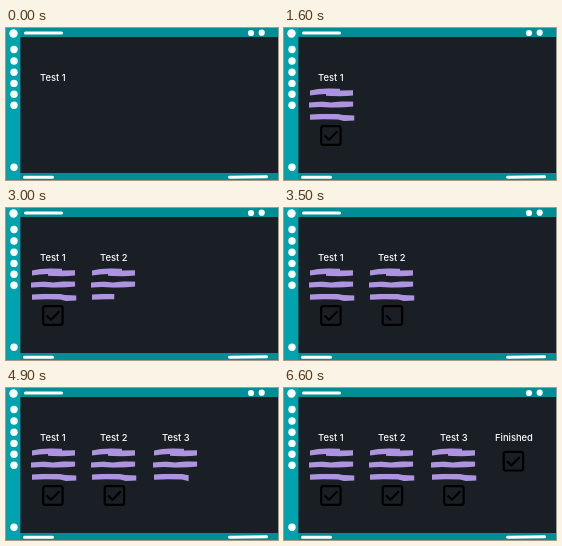
Recreate the animation shown at these times as an HTML page. Size 272x152 px, loop 7000 ms.

```html
<!DOCTYPE html>
<html lang="en">
<head>
<meta charset="utf-8">
<title>Test board</title>
<style>
  html, body { margin: 0; width: 100%; height: 100%; overflow: hidden; background: #1a1f25; }
  svg { display: block; width: 272px; height: 152px; }
  text { font: 500 9.4px Inter, "Open Sans", sans-serif; fill: #fff; }
  .bar { stroke: #fff; stroke-linecap: round; stroke-width: 3; }
  .tick path { fill: none; stroke: #000; stroke-width: 2.2; stroke-linejoin: round; }
</style>
</head>
<body>
<svg id="stage" viewBox="0 0 272 152">
  <rect width="272" height="152" fill="#008d94"/>
  <rect width="14.4" height="152" fill="#00a3ad"/>
  <rect x="14.4" y="9" width="257.6" height="136" fill="#1a1f25"/>
  <path class="bar" d="M19.5 5H55.5M18.5 149.3H46.5M223.5 149.2L260.5 148.8"/>
  <g id="dots" fill="#fff"></g>
</svg>
<script>
const NS = 'http://www.w3.org/2000/svg';
const stage = document.getElementById('stage');
const LOOP = 7000, STEP = 100;
const parts = [];

function add(parent, tag, attrs) {
  const el = document.createElementNS(NS, tag);
  for (const key in attrs) el.setAttribute(key, attrs[key]);
  return parent.appendChild(el);
}

// Each part gets its progress (0 to 1) between two times.
function animate(from, to, draw) {
  parts.push({ from, to, draw });
}

function label(text, x, from) {
  const el = add(stage, 'text', { x, y: 53 });
  el.textContent = text;
  animate(from, from + 200, p => el.style.opacity = p);
}

function marker(d, dx, from, to) {
  const el = add(stage, 'path', { d, fill: '#ae94e0', transform: `translate(${dx})` });
  animate(from, to, p => el.style.clipPath = `inset(0 ${100 - p * 100}% 0 0)`);
}

function trace(parent, d, from, to) {
  const el = add(parent, 'path', { d, pathLength: 1, 'stroke-dasharray': '1 2' });
  animate(from, to, p => {
    el.style.strokeDashoffset = 1 - p;
    el.style.visibility = p ? 'visible' : 'hidden';
  });
}

function tick(x, y, from, to) {
  const g = add(stage, 'g', { class: 'tick', transform: `translate(${x} ${y})` });
  const mid = from + (to - from) * 0.6;
  trace(g, 'M-7.7-9.3H7.7Q9.7-9.3 9.7-7.3V7.3Q9.7 9.3 7.7 9.3H-7.7Q-9.7 9.3-9.7 7.3V-7.3Q-9.7-9.3-7.7-9.3Z', from, mid);
  trace(g, 'M-6.3 0L-2 4.2L6.5-4.2', mid, to);
}

const dots = document.getElementById('dots');
const dot = (cx, cy, r) => add(dots, 'circle', { cx, cy, r });
dot(7.5, 5.5, 4.2);
[21.5, 33, 44.3, 55.4, 66.3, 77.2, 139.3].forEach(y => dot(8, y, 3.7));
dot(245, 5, 3.1);
dot(255.7, 4.7, 3.1);

const strokes = [
  'M26 62.4L34 61L45 60.3L56 60.8V62.6L69 62.2V67.6L56 68.4L42 67.8V66L34 66.4L26 67.4Z',
  'M25 74.4L38 73.6L47 74.6L58 73.2L69.3 73.4V78.6L58 79.4L47 79.8L36 79L25 79.8Z',
  'M26 86.6L40 85.8L54 86L59 87L70.5 87.4V92.6L60 93L54 91.4L40 91.2L26 91.8Z'
];

const columns = [
  { dx: 0, text: -200, lines: [[0, 300], [210, 860], [950, 1250]], check: [1200, 1600] },
  { dx: 60, text: 1800, lines: [[2000, 2400], [2400, 2800], [2800, 3200]], check: [3200, 3600] },
  { dx: 122, text: 3500, lines: [[3600, 4030], [4100, 4500], [4550, 5000]], check: [5050, 5500] }
];

columns.forEach(({ dx, text, lines, check }, i) => {
  label(`Test ${i + 1}`, 34 + dx, text);
  lines.forEach((span, k) => marker(strokes[k], dx, ...span));
  tick(46.9 + i * 61.5, 107.5, ...check);
});
label('Finished', 211, 5500);
tick(229.4, 73.2, 5800, 6500);

function frame(now) {
  const t = Math.floor(now % LOOP / STEP) * STEP;
  for (const { from, to, draw } of parts) {
    draw(Math.max(0, Math.min(1, (t - from) / (to - from))));
  }
  requestAnimationFrame(frame);
}
frame(0);
</script>
</body>
</html>
```
